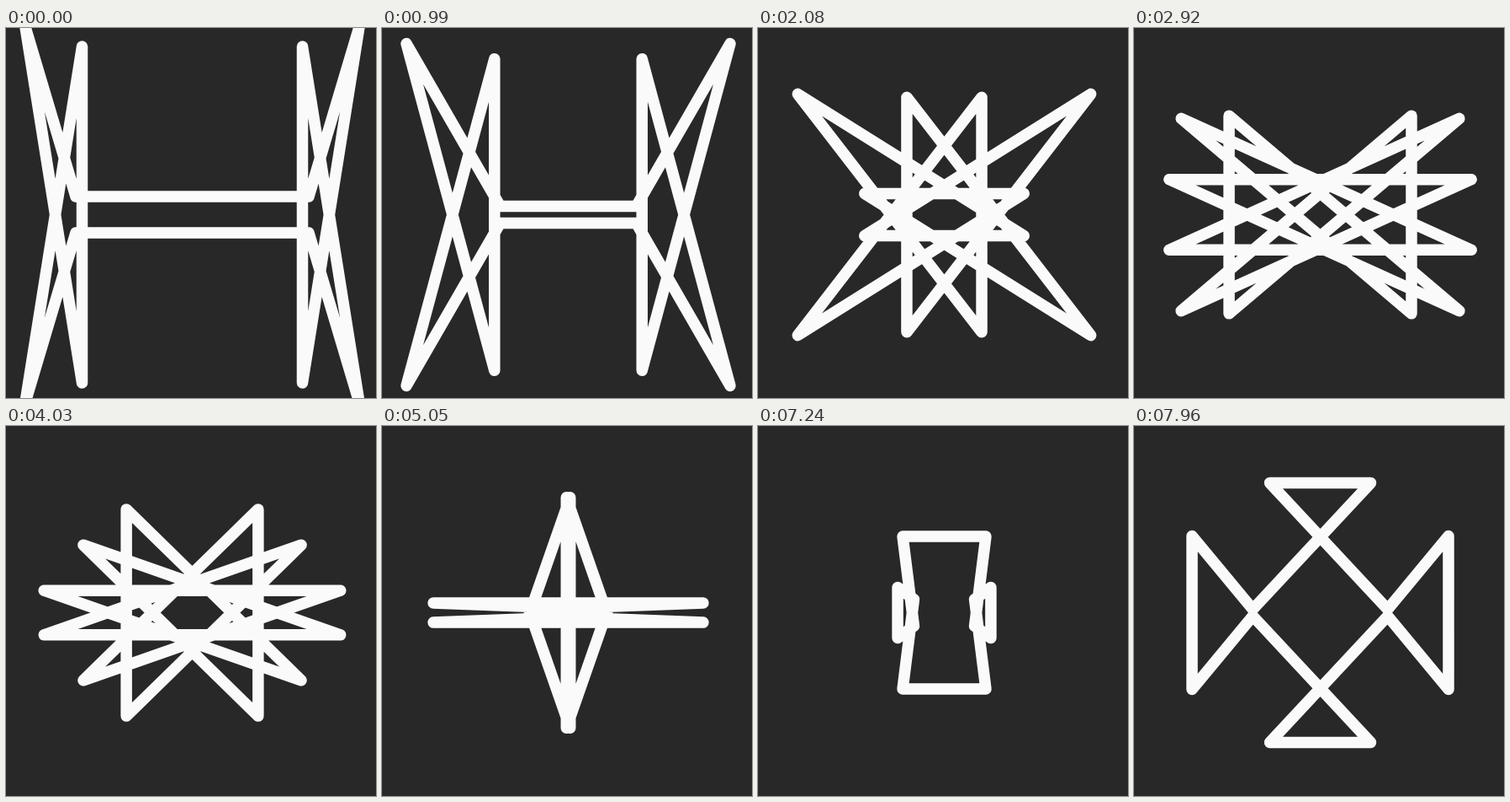
An HTML page with a canvas for the animation above (7990 ms loop, 440 by 439 pixels).

```html
<!DOCTYPE html>
<html lang="en">
<head>
<meta charset="utf-8">
<title>Morphing line star</title>
<style>
  html, body { margin: 0; width: 100%; height: 100%; overflow: hidden; background: #282828; }
  canvas { display: block; }
</style>
</head>
<body>
<canvas id="stage" width="440" height="439"></canvas>
<script>
const ctx = document.getElementById('stage').getContext('2d');
const LOOP = 7990, START = 174, SPAN = 2939, CENTER = 221.5;

const point = (x, y) => ({ x, y });

// The star is one corner motif mirrored four ways; each of its points visits four key positions.
const post = [point(-131, 199.5), point(111, 116.5), point(-36, 144), point(223.5, -179.5)];
const beam = [point(-138.5, -21.5), point(183, 42.5), point(152.5, -30.5), point(-140, -200.5)];
const wing = [point(-198.5, -222.5), point(-165, -113), point(-5.5, 34.5), point(112.5, -18.5)];

const mix = (a, b, k) => a + (b - a) * k;
const ease = u => (1 - Math.cos(Math.PI * u)) / 2;

function along(keys, time) {
  const pos = Math.max(0, (time - START) / SPAN);
  const i = Math.min(Math.floor(pos), keys.length - 2);
  const k = ease(pos - i);
  return point(mix(keys[i].x, keys[i + 1].x, k), mix(keys[i].y, keys[i + 1].y, k));
}

function draw(time) {
  const [p, b, w] = [post, beam, wing].map(keys => along(keys, time));
  const motif = [point(p.x, -p.y), p, w, b, point(-b.x, b.y)];

  ctx.setTransform(1, 0, 0, 1, 0, 0);
  ctx.fillStyle = '#282828';
  ctx.fillRect(0, 0, 440, 439);
  ctx.translate(CENTER, CENTER);
  ctx.strokeStyle = '#fafafa';
  ctx.lineWidth = 13.5;
  ctx.lineJoin = ctx.lineCap = 'round';
  ctx.beginPath();
  for (const sx of [-1, 1]) {
    for (const sy of [-1, 1]) {
      motif.forEach(({ x, y }, i) => ctx[i ? 'lineTo' : 'moveTo'](sx * x, sy * y));
    }
  }
  ctx.stroke();
}

const begin = performance.now();
function tick() {
  draw((performance.now() - begin) % LOOP);
  requestAnimationFrame(tick);
}
tick();
</script>
</body>
</html>
```
